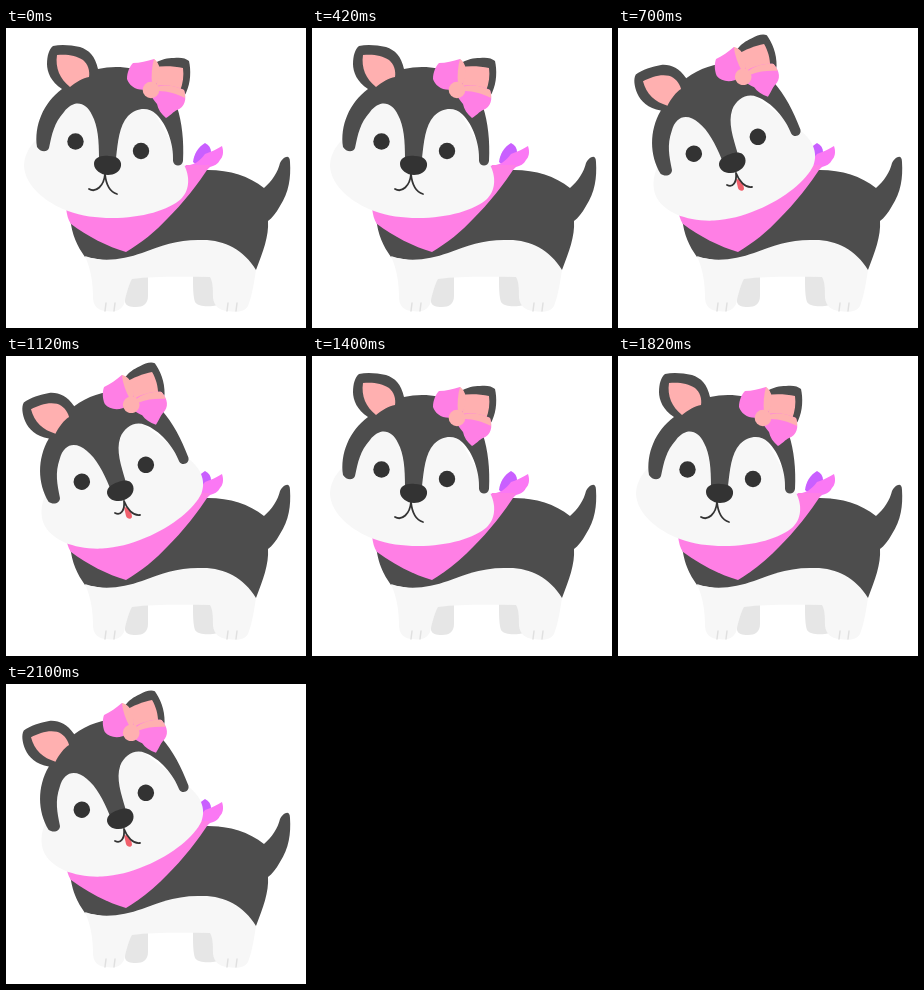
Write an HTML page that moves like this. It is 300 by 300 pixels and loops after 2.8 s.

```html
<!DOCTYPE html>
<html lang="en">
<head>
<meta charset="utf-8">
<title>Husky puppy tilting its head</title>
<style>
html, body { margin: 0; width: 100%; height: 100%; overflow: hidden; background: #fff; }
svg { display: block; width: 100vw; height: 100vh; }
.dark { fill: #4d4d4d; }
.white { fill: #f7f7f7; }
.shade { fill: #e6e6e6; }
.pink { fill: #ff7fe5; }
.peach { fill: #ffb0b0; }
.ink { fill: #333; }
.line { fill: none; stroke: #333; stroke-width: 1.8; stroke-linecap: round; stroke-linejoin: round; }
.toe { fill: none; stroke: #e0e0e0; stroke-width: 1.5; stroke-linecap: round; }
</style>
</head>
<body>
<svg viewBox="0 0 300 300">
  <g id="body">
    <path class="shade" d="M118 246H142V268C142 276 137 279 130 279C124 279 120 278 119 274ZM187 244H212V277C204 279 192 279 189 274C187 268 187 258 187 249Z"/>
    <path class="dark" d="M64 190C105 165 160 141 202 142C224 142 243 148 258 160C266 153 272 144 274 135C277 129 284 125 284 134C285 150 283 164 274 178C270 185 266 190 262 193C263 208 257 224 250 242L180 246L79 229C71 218 66 207 64 190Z"/>
    <path class="white" d="M79 228C98 235 118 231 136 225C156 217 174 211 197 212C219 212 238 222 250 242C248 255 246 268 242 278C238 285 229 284 221 283C213 282 208 278 207 270C207 262 207 254 204 249C178 249 150 248 126 251C122 258 120 268 118 276C114 284 107 284 99 283C91 282 87 277 87 269C87 255 85 242 79 228Z"/>
    <path class="toe" d="M100 275L99 283M109 275L108 283M222 275L221 283M231 275L230 283"/>
    <path fill="#c95fff" d="M187 134C188 126 192 119 199 115C203 117 205 120 205 124L194 140Z"/>
    <path fill="#fb78f4" d="M176 138C188 138 194 133 199 126C205 124 211 121 216 118C218 124 217 129 214 132C212 136 208 138 204 139L190 152Z"/>
    <path class="pink" d="M60 180C96 194 150 185 175 150L180 137L204 137C192 157 176 176 162 190C149 204 135 215 120 224C102 219 81 208 65 196C62 192 61 187 60 180Z"/>
  </g>

  <g id="head">
    <path class="white" d="M30 112C22 120 18 129 18 138C19 157 38 174 62 183C76 188 90 190 106 190C136 190 163 182 175 171C185 161 184 146 176 133L140 70L72 66Z"/>
    <path class="dark" d="M56 61C45 54 41 44 41 36C41 28 43 21 47 18C55 16 65 17 74 19C83 22 89 28 92 41C109 37 128 39 142 46C143 36 155 30 168 30C174 29 180 30 183 33C185 42 185 54 180 65L171 79C176 94 178 113 177 133C176 139 168 139 167 133C168 117 161 96 150 86C142 78 130 80 122 88C113 98 112 114 110 130H93C93 113 92 98 86 87C80 74 68 71 58 84C48 95 46 106 43 120C41 125 34 124 31 119C28 98 37 75 56 61Z"/>
    <path class="peach" d="M64 59C54 51 49 40 51 27C60 26 70 27 77 32C82 36 84 43 83 49C77 50 70 54 64 59ZM148 39C157 38 168 38 177 40C178 48 177 55 174 63L151 62Z"/>
    <circle class="ink" cx="69.5" cy="113.500" r="8.2"/>
    <circle class="ink" cx="135" cy="123" r="8.2"/>
    <path class="ink" d="M88 136C88 130 94 127 103 128C111 128 116 132 115 138C114 144 108 147 102 147C95 147 88 142 88 136Z"/>
    <g id="bow" transform="translate(145 62)">
      <path class="pink" d="M-3 -1C-13 2 -22 -4 -24 -11C-24 -18 -21 -24 -18 -27C-11 -27 -4 -29 3 -31C10 -25 9 -14 5 -5Z"/>
      <path class="pink" d="M4 -4C14 -6 25 -4 33 0C36 9 34 17 26 20C22 22 20 25 15 28C10 24 7 19 6 14C3 10 0 7 -1 3Z"/>
      <path class="peach" d="M1 -6C0 -15 1 -24 3 -31C9 -27 10 -18 8 -12C7 -9 6 -7 4 -5Z"/>
      <path class="peach" d="M6 -3C15 -6 25 -4 33 0C34 3 34 5 34 8C26 4 17 1 8 1Z"/>
      <circle class="peach" r="8.3"/>
    </g>
  </g>

  <g id="smile">
    <path class="line" d="M83 161C90 165 98 158 99 146C100 156 104 164 111 166"/>
  </g>
  <g id="lick">
    <path fill="#f0606c" d="M118 151C122 151 126 156 126 161C125 164 121 163 120 160Z"/>
    <path class="line" d="M109 157C115 160 119 154 118 145C121 153 127 160 134 159"/>
  </g>
</svg>
<script>
const STEP = 700;
const poses = [
  { mouth: "smile", head: "" },
  { mouth: "lick", head: "translate(13 -2) rotate(-23 101 137)" }
];
const find = id => document.getElementById(id);
const start = performance.now();

function draw(now) {
  const pose = poses[Math.floor(Math.max(0, now - start) / STEP) % poses.length];
  find("head").setAttribute("transform", pose.head);
  for (const { mouth } of poses) {
    find(mouth).setAttribute("visibility", mouth === pose.mouth ? "visible" : "hidden");
  }
  requestAnimationFrame(draw);
}
draw(start);
</script>
</body>
</html>
```
